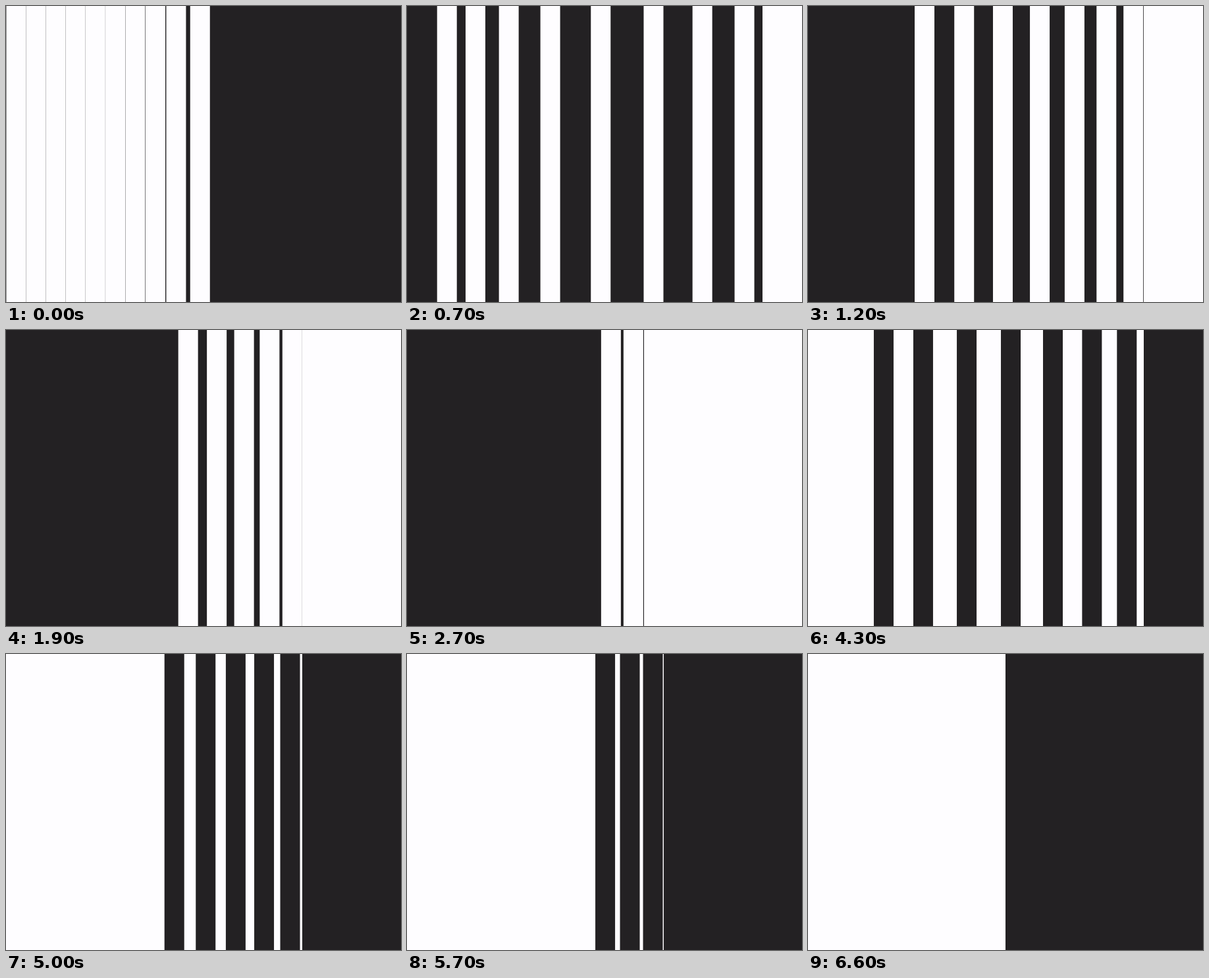
An HTML page for the animation above (6.7 s loop, 600 by 450 pixels).

```html
<!DOCTYPE html>
<html lang="en">
<head>
<meta charset="utf-8">
<title>Sliding stripes</title>
<style>
  html, body { margin: 0; width: 100%; height: 100%; overflow: hidden; }
  svg { display: block; width: 600px; height: 450px; }
</style>
</head>
<body>
<svg viewBox="0 0 600 450"><rect id="ground" width="600" height="450"/></svg>
<script>
const DARK = '#232123', LIGHT = '#fefdff';
const COUNT = 10, WIDTH = 30, TRAVEL = 300;
const LOOP = 6700, STEP = 100;   // the picture advances ten times a second
const PASS = 10000 / 3;          // duration of the slowest stripe
const LEAD = 100 / 3;            // the loop opens slightly into the first pass

const svg = document.querySelector('svg');
const ground = document.getElementById('ground');
const stripes = Array.from({ length: COUNT }, () => {
  const rect = document.createElementNS('http://www.w3.org/2000/svg', 'rect');
  rect.setAttribute('width', WIDTH);
  rect.setAttribute('height', 450);
  return svg.appendChild(rect);
});

function cubicBezier(x1, y1, x2, y2) {
  const at = (a, b, s) => 3 * (1 - s) * (1 - s) * s * a + 3 * (1 - s) * s * s * b + s * s * s;
  return u => {
    if (u <= 0) return 0;
    if (u >= 1) return 1;
    let low = 0, high = 1;
    for (let i = 0; i < 30; i++) {
      const mid = (low + high) / 2;
      if (at(x1, x2, mid) < u) low = mid; else high = mid;
    }
    return at(y1, y2, low);
  };
}
const ease = cubicBezier(0.474, 0.07, 0.166, 1);

function draw(ms) {
  const time = Math.floor((ms % LOOP) / STEP) * STEP + LEAD;
  const second = time >= PASS - 0.01;
  const elapsed = second ? time - PASS : time;
  ground.setAttribute('fill', second ? LIGHT : DARK);
  stripes.forEach((rect, i) => {
    const duration = PASS * (COUNT - i) / COUNT;
    rect.setAttribute('x', (i * WIDTH + TRAVEL * ease(elapsed / duration)).toFixed(3));
    rect.setAttribute('fill', second ? DARK : LIGHT);
  });
}

const start = performance.now();
function tick() {
  draw(performance.now() - start);
  requestAnimationFrame(tick);
}
tick();
</script>
</body>
</html>
```
